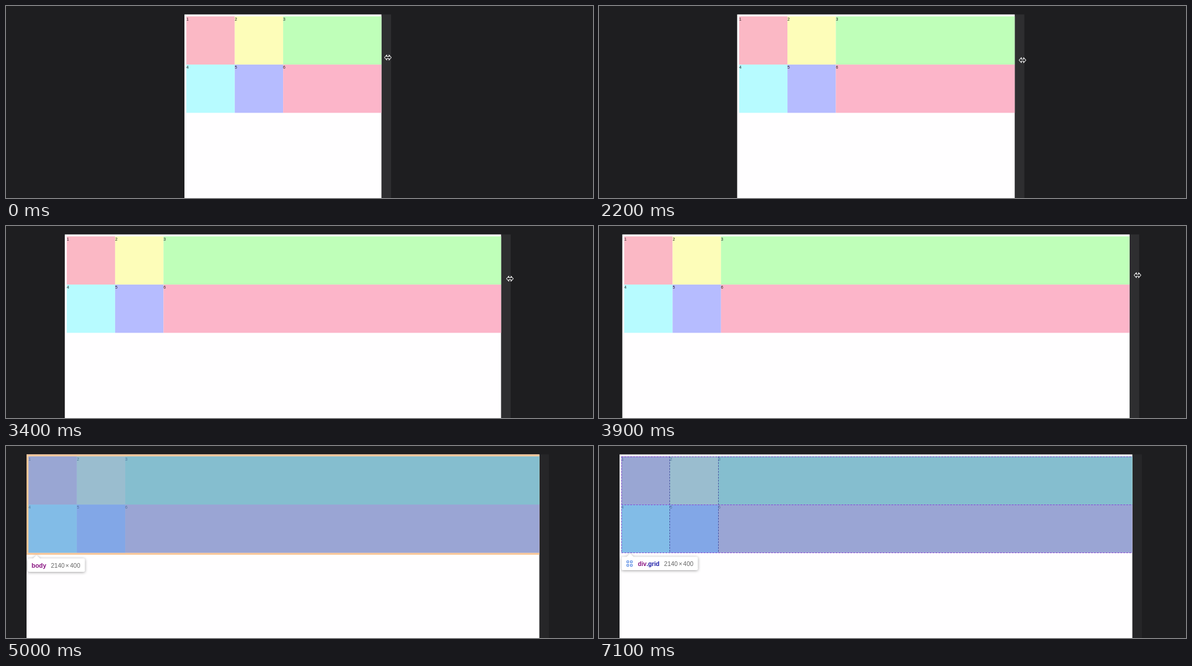
These frames come from a looping animation (1000 px wide and 328 px high, 7200 ms). An HTML page with a canvas:

```html
<!DOCTYPE html>
<html lang="en">
<head>
<meta charset="utf-8">
<title>Grid resize</title>
<style>
  html, body { margin: 0; width: 100%; height: 100%; overflow: hidden; background: #1e1e20; }
  canvas { display: block; width: 1000px; height: 328px; }
</style>
</head>
<body>
<canvas id="stage"></canvas>
<script>
const W = 1000, H = 328, LOOP = 7200, STEP = 100;
const CENTER = 480, TOP = 14.4, BAR = 16.4;
const MARGIN = 3.3, CELL = 82.4;
const FONT = '"Liberation Sans", Arial, sans-serif';
const FILLS = ['#fbb8c5', '#fdfdb9', '#bfffb9', '#b7fbff', '#b6bcff', '#fcb5c9'];

// [time, value] pairs
const LEFT = [[700, 304], [900, 303], [1100, 300.5], [1300, 296], [1500, 286.5], [1900, 259],
  [2300, 227.5], [2900, 154], [3100, 136.5], [3900, 39.7], [4100, 35]];
const POINTER_DX = [[700, 11], [1300, 12.5], [1500, 11.5], [2300, 13.5], [2900, 15],
  [3100, 16], [3900, 13.5], [4100, 12]];
const POINTER_Y = [[1300, 88], [2900, 96], [3900, 84], [4400, 84]];
const POINTER_OFF = 4400;
const HOVERS = [[0, ''], [4800, 'body'], [5400, 'grid'], [5900, 'body'], [6500, 'grid']];

const canvas = document.getElementById('stage');
const ctx = canvas.getContext('2d');
const dpr = window.devicePixelRatio || 1;
canvas.width = W * dpr;
canvas.height = H * dpr;

function track(keys, t) {
  if (t <= keys[0][0]) return keys[0][1];
  for (let i = 1; i < keys.length; i++) {
    const [t0, v0] = keys[i - 1], [t1, v1] = keys[i];
    if (t <= t1) return v0 + (v1 - v0) * (t - t0) / (t1 - t0);
  }
  return keys[keys.length - 1][1];
}

function rect(x, y, w, h, fill) {
  ctx.fillStyle = fill;
  ctx.fillRect(x, y, w, h);
}

function text(str, x, y, size, fill, weight = 'normal') {
  ctx.font = `${weight} ${size}px ${FONT}`;
  ctx.fillStyle = fill;
  ctx.fillText(str, x, y);
  return x + ctx.measureText(str).width;
}

function drawCells(x, y, right) {
  FILLS.forEach((fill, i) => {
    const col = i % 3, row = Math.floor(i / 3);
    const cx = x + col * CELL, cy = y + row * CELL;
    rect(cx, cy, col < 2 ? CELL : right - cx, CELL, fill);
    text(i + 1, cx, cy + 7.2, 7, '#222');
  });
}

function line(x0, y0, x1, y1, color) {
  ctx.strokeStyle = color;
  ctx.beginPath();
  ctx.moveTo(x0, y0);
  ctx.lineTo(x1, y1);
  ctx.stroke();
}

function drawGridLines(x, y, right) {
  ctx.save();
  ctx.lineWidth = 1;
  ctx.setLineDash([3, 2]);
  for (let i = 0; i < 3; i++) {
    const gx = Math.floor(x + i * CELL) + 0.5, gy = Math.floor(y + i * CELL + 0.4) + 0.5;
    line(gx, y, gx, y + 2 * CELL, i ? '#4650a0' : '#7a48d0');
    line(x, gy, right, gy, '#8544d6');
  }
  ctx.restore();
}

function drawBubble(x, y, w, h, tip) {
  ctx.save();
  ctx.shadowColor = 'rgba(0,0,0,.38)';
  ctx.shadowBlur = 5 * dpr;
  ctx.shadowOffsetY = dpr;
  ctx.fillStyle = '#fff';
  ctx.beginPath();
  ctx.roundRect(x, y, w, h, 2.5);
  ctx.moveTo(tip - 6, y);
  ctx.lineTo(tip, y - 5.5);
  ctx.lineTo(tip + 6, y);
  ctx.fill();
  ctx.restore();
}

function drawSize(x, y) {
  const gray = '#666', size = 10.5;
  x = text('2140', x, y, size, gray);
  x = text('×', x + 1.5, y, size, gray);
  text('400', x + 1.5, y, size, gray);
}

function drawBodyTip() {
  drawBubble(37, 192, 97.5, 23, 52);
  text('body', 43.5, 207.6, 10.5, '#881280', 'bold');
  drawSize(76.5, 207.6);
}

function drawGridTip() {
  drawBubble(38.2, 189.2, 130.3, 22.8, 53);
  ctx.strokeStyle = '#3b78e0';
  ctx.lineWidth = 1;
  for (const x of [47.5, 53.5])
    for (const y of [196.2, 202.2]) ctx.strokeRect(x, y, 3.2, 3.2);
  const end = text('div', 66.3, 204.6, 10.2, '#881280', 'bold');
  text('.grid', end, 204.6, 10.2, '#1a1aa6', 'bold');
  drawSize(110.8, 204.6);
}

function drawHighlight(kind, left, x, y, right) {
  const h = 2 * CELL;
  if (kind === 'body') {
    const orange = '#f9c697';
    rect(left, TOP, right - left, MARGIN, orange);
    rect(left, y + h, right - left, MARGIN, orange);
    rect(left, y, MARGIN, h, orange);
  }
  rect(x, y, right - x, h, 'rgba(104,157,219,.66)');
  if (kind === 'body') return drawBodyTip();
  drawGridLines(x, y, right);
  drawGridTip();
}

function drawPointer(x, y) {
  const half = [[-5.8, 0], [-1.8, -4.3], [-1.8, -1.5], [1.8, -1.5], [1.8, -4.3], [5.8, 0]];
  ctx.beginPath();
  half.forEach(([px, py]) => ctx.lineTo(x + px, y + py));
  half.slice(1, -1).reverse().forEach(([px, py]) => ctx.lineTo(x + px, y - py));
  ctx.closePath();
  ctx.fillStyle = '#1c1c1e';
  ctx.fill();
  ctx.strokeStyle = '#f4f4f4';
  ctx.lineWidth = 1.1;
  ctx.lineJoin = 'round';
  ctx.stroke();
}

function draw(t) {
  const left = track(LEFT, t);
  const barEnd = 2 * CENTER - left, right = barEnd - BAR;
  const x = left + MARGIN, y = TOP + MARGIN;
  const dragging = t < POINTER_OFF;
  const hover = HOVERS.filter(([start]) => t >= start).pop()[1];

  ctx.setTransform(dpr, 0, 0, dpr, 0, 0);
  rect(0, 0, W, H, '#1e1e20');
  rect(right, TOP, BAR, H - TOP, dragging ? '#2e2e30' : '#262628');
  rect(left, TOP, right - left, H - TOP, '#fffeff');
  drawCells(x, y, right);
  if (hover) drawHighlight(hover, left, x, y, right);
  if (dragging) drawPointer(right + track(POINTER_DX, t), track(POINTER_Y, t));
}

function tick() {
  const t = performance.now() % LOOP;
  draw(Math.floor(t / STEP) * STEP);
  requestAnimationFrame(tick);
}
tick();
</script>
</body>
</html>
```
